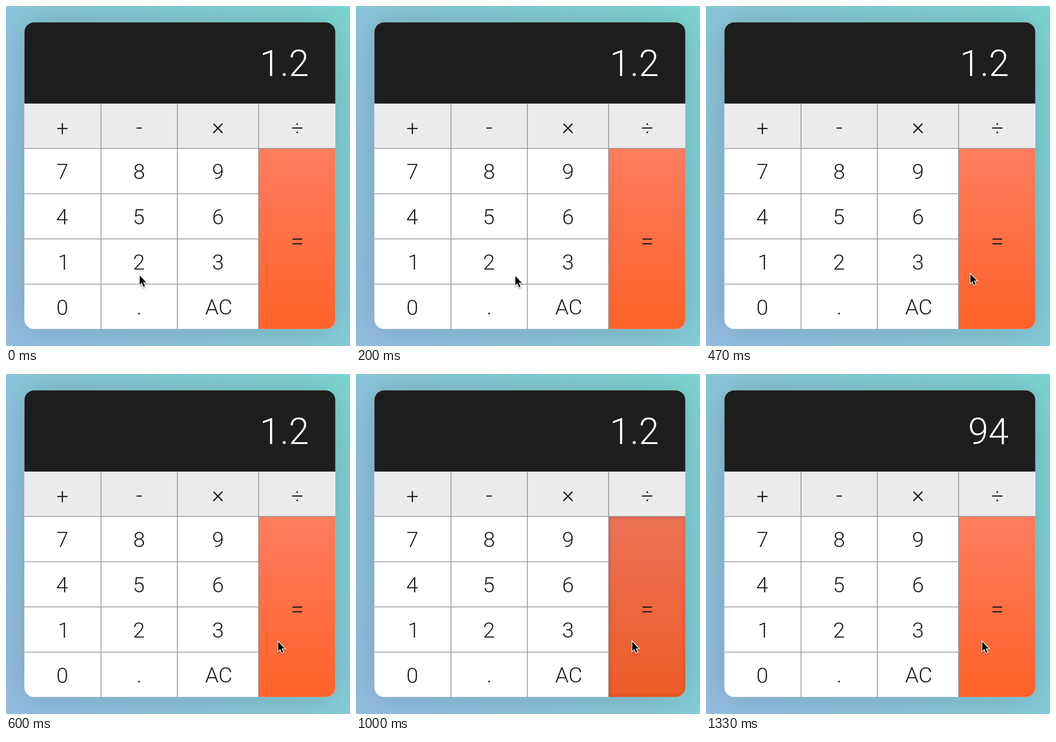
Recreate the animation shown at these times as an HTML page. Size 753 by 743 pixels, loop 2.14 s.

```html
<!DOCTYPE html>
<html lang="en">
<head>
<meta charset="utf-8">
<title>Calculator</title>
<style>
  html, body { margin: 0; width: 100%; height: 100%; overflow: hidden; }
  body { position: relative; background: linear-gradient(236deg, #7dd5d2, #93bce0); }
  .shadow {
    position: absolute; left: 40px; top: 36px; width: 681px; height: 670px;
    border-radius: 21px; box-shadow: 0 0 80px rgba(0, 0, 0, .17);
  }
  svg { position: absolute; left: 0; top: 0; display: block; }
  text { font-family: Roboto, "Liberation Sans", Arial, sans-serif; font-weight: 300; fill: #1c1c1c; }
  #display { fill: #fff; }
  #cursor { filter: drop-shadow(0 2px 1.5px rgba(0, 0, 0, .35)); }
</style>
</head>
<body>
<div class="shadow"></div>
<svg width="753" height="743" viewBox="0 0 753 743">
  <defs>
    <linearGradient id="orange" x1="0" y1="0" x2="0" y2="1">
      <stop offset="0" stop-color="#ff7c5f"/>
      <stop offset="1" stop-color="#ff6228"/>
    </linearGradient>
    <clipPath id="body"><rect x="40.3" y="35.8" width="680.5" height="670" rx="21"/></clipPath>
    <clipPath id="equalKey"><rect x="553.6" y="312" width="168" height="394"/></clipPath>
    <filter id="soft" x="-20%" y="-20%" width="140%" height="140%"><feGaussianBlur stdDeviation="5"/></filter>
  </defs>
  <g clip-path="url(#body)">
    <rect x="40" y="35" width="682" height="672" fill="#fff"/>
    <rect x="40" y="35" width="682" height="178.5" fill="#1e1e1e"/>
    <rect x="40" y="213.5" width="682" height="98" fill="#ebebeb"/>
    <rect x="553" y="311" width="169" height="396" fill="url(#orange)"/>
    <g id="press" clip-path="url(#equalKey)">
      <rect x="553" y="311" width="169" height="396" fill="#000" opacity=".07"/>
      <rect x="552" y="310.5" width="170" height="397" rx="4" fill="none" stroke="#000" stroke-width="6" opacity=".16" filter="url(#soft)"/>
    </g>
    <path d="M208 213.5V706M375 213.5V706M553 213.5V706M40 311.3H721M40 410.2H553M40 509H553M40 607.7H553"
          fill="none" stroke="#8c8c8c" stroke-width="1.6"/>
  </g>
  <g id="labels"></g>
  <text id="display"></text>
  <path id="cursor" d="M1.7 3V23.2L6.1 19L9.9 27.6L13.1 26.2L9.4 17.7H15.8Z"
        fill="#000" stroke="#fff" stroke-width="3" paint-order="stroke"/>
</svg>
<script>
const LOOP = 2140;
const $ = id => document.getElementById(id);
const pen = document.createElement("canvas").getContext("2d");

// Puts the ink of a string at (x, y): centred vertically, align 0.5 = centre, 1 = right edge.
function place(el, str, size, x, y, align) {
  pen.font = `300 ${size}px Roboto, "Liberation Sans", Arial, sans-serif`;
  const m = pen.measureText(str);
  const left = -m.actualBoundingBoxLeft, right = m.actualBoundingBoxRight;
  el.textContent = str;
  el.setAttribute("font-size", size);
  el.setAttribute("x", x - left - (right - left) * align);
  el.setAttribute("y", y + (m.actualBoundingBoxAscent - m.actualBoundingBoxDescent) / 2);
}

function label(str, x, y, size = 47) {
  const el = document.createElementNS("http://www.w3.org/2000/svg", "text");
  $("labels").append(el);
  place(el, str, size, x, y, 0.5);
}

const cols = [123.3, 291.5, 464, 637.3];
["789", "456", "123"].forEach((row, r) =>
  [...row].forEach((digit, c) => label(digit, cols[c], 361.5 + r * 98.8)));
label("+", cols[0], 267);
label("-", cols[1], 266.5, 50);
label("×", cols[2], 267, 52);
label("÷", cols[3], 267);
label("=", cols[3], 514.5, 52);
label("0", cols[0], 658);
label(".", cols[1], 672);
label("AC", cols[2] + 0.5, 657.5);

// Pointer stops: time, x, y
const stops = [
  [0, 291, 586], [130, 307, 586.5], [200, 347, 587], [270, 413, 587],
  [330, 481, 586], [400, 541, 584], [470, 577, 582.5], [530, 588, 582],
  [600, 594, 582], [670, 598, 582], [730, 601, 582], [800, 603, 582]
];

let shown = "";
function draw(t) {
  const [, x, y] = stops.findLast(s => s[0] <= t);
  $("cursor").setAttribute("transform", `translate(${x} ${y})`);
  $("press").setAttribute("visibility", t >= 1000 && t < 1070 ? "visible" : "hidden");
  const value = t < 1070 ? "1.2" : "94";
  if (value !== shown) place($("display"), shown = value, 80, 661, 123.5, 1);
}

const start = performance.now();
function tick() {
  draw((performance.now() - start) % LOOP);
  requestAnimationFrame(tick);
}
tick();
</script>
</body>
</html>
```
